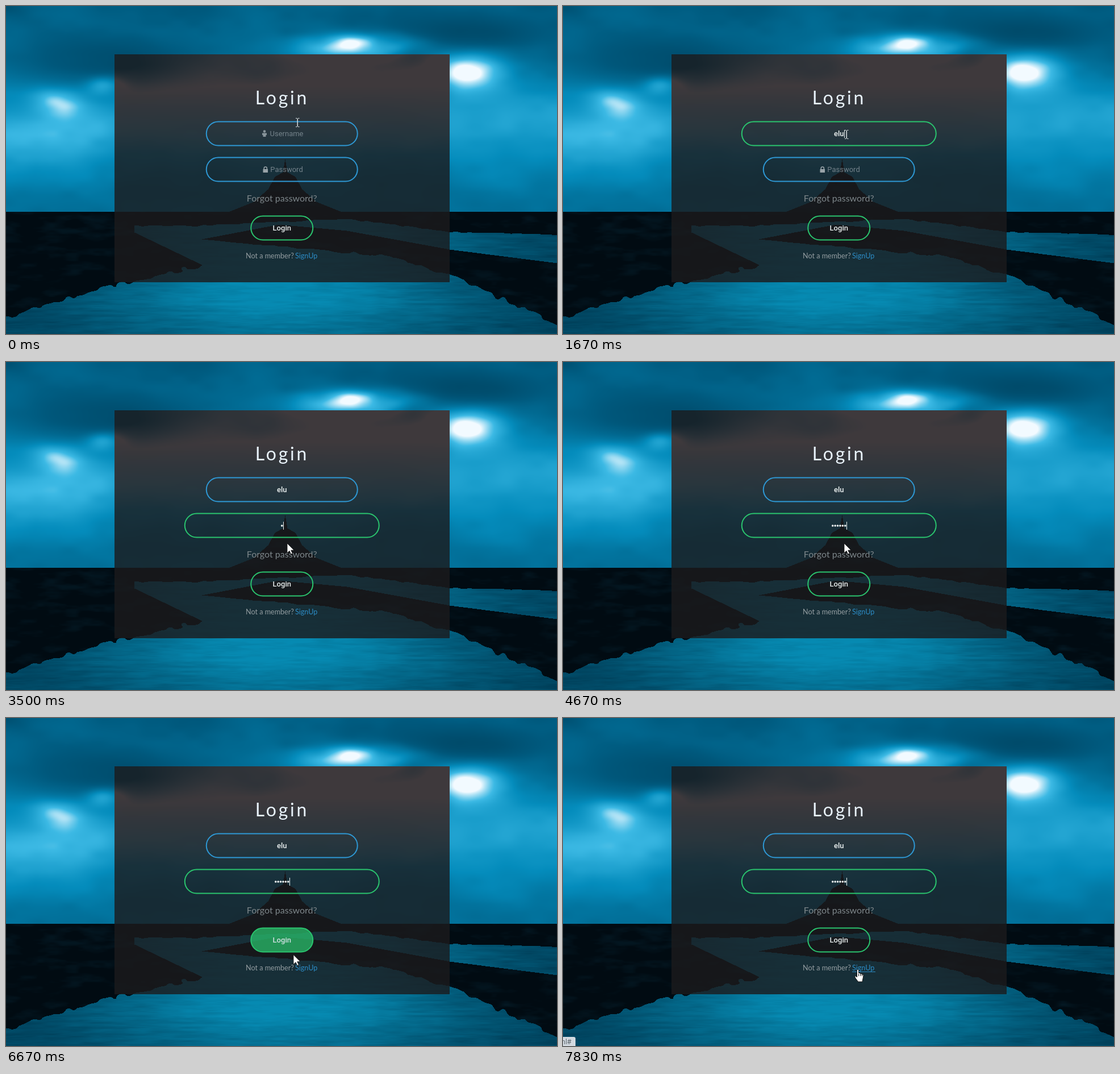
Animation of 970 by 577 pixels, one loop 8000 ms. Source, as an HTML page with a canvas:

```html
<!DOCTYPE html>
<html lang="en">
<head>
<meta charset="utf-8">
<title>Login</title>
<style>
html, body { margin: 0; width: 970px; height: 577px; overflow: hidden; background: #02131b; }
canvas { display: block; }
</style>
</head>
<body>
<canvas id="stage" width="970" height="577"></canvas>
<script>
const W = 970, H = 577, LOOP = 8000, RATE = 6;
const HORIZON = 362, CENTER = 485.75;
const BLUE = [46, 152, 212], GREEN = [42, 196, 110];
const c = document.getElementById('stage').getContext('2d');

const clamp = v => Math.min(1, Math.max(0, v));
const mix = (a, b, k) => a + (b - a) * k;
const blend = (p, q, k) => p.map((v, i) => mix(v, q[i], k));
const smooth = k => k * k * (3 - 2 * k);
const bell = d => Math.exp(-d * d);
const rgb = (p, a = 1) => `rgba(${p.map(Math.round).join()},${a})`;

// CSS "ease" timing curve
function ease(x) {
  x = clamp(x);
  let lo = 0, hi = 1, s = 0.5;
  for (let i = 0; i < 18; i++) {
    s = (lo + hi) / 2;
    const bx = 0.75 * s * (1 - s) + s * s * s;
    if (bx < x) lo = s; else hi = s;
  }
  return 0.3 * s * (1 - s) * (1 - s) + 3 * s * s * (1 - s) + s * s * s;
}
const ramp = (t, start) => ease((t - start) / 250);

// height of a line through [x, y] points
function along(points, x) {
  let i = 1;
  while (i < points.length - 1 && points[i][0] < x) i++;
  const [x0, y0] = points[i - 1], [x1, y1] = points[i];
  return mix(y0, y1, clamp((x - x0) / (x1 - x0)));
}

// ---- landscape ----

let seed = 7;
const lattice = Float32Array.from({ length: 4096 }, () =>
  (seed = (seed * 16807) % 2147483647) / 2147483647 - 0.5);

function noise(x, y) {
  const i = Math.floor(x), j = Math.floor(y);
  const u = smooth(x - i), v = smooth(y - j);
  const at = (a, b) => lattice[(a & 63) + (b & 63) * 64];
  return mix(mix(at(i, j), at(i + 1, j), u), mix(at(i, j + 1), at(i + 1, j + 1), u), v);
}
const clouds = (x, y) => noise(x, y) + noise(x * 2, y * 2) / 2 + noise(x * 4, y * 4) / 4;

const SKY = [[0, 52, 76], [0, 88, 124], [4, 140, 188], [60, 185, 228], [242, 250, 255]];
// x, y, width, height, strength
const GLOWS = [
  [610, 68, 95, 20, 0.6], [815, 115, 55, 30, 0.55], [90, 168, 45, 24, 0.35],
  [172, 140, 32, 16, 0.35], [70, 225, 130, 45, 0.12],
  [180, 110, 150, 50, -0.2], [800, 50, 160, 38, -0.14]
];

function skyTone(x, y) {
  const n = clouds(x / 110, y / 60);
  let tone = 0.28 + 0.12 * y / HORIZON + 0.25 * bell((y - 205) / 85) + 0.1 * n;
  for (const [gx, gy, w, h, power] of GLOWS) {
    const dx = (x - gx) / w, dy = (y - gy) / h;
    const d = dx * dx + dy * dy;
    if (d < 6) tone += power * Math.exp(-d) * (1 + n);
  }
  return clamp(tone);
}

function skyColor(tone) {
  const i = Math.min(3, Math.floor(tone * 4));
  return blend(SKY[i], SKY[i + 1], tone * 4 - i);
}

const FAR_BANK = [[340, 386], [600, 374], [781, 397], [W, 402]];
const LEFT_BANK = [[0, 548], [190, 490], [345, 456]];
const RIGHT_TOP = [[344, 410], [480, 384], [600, 395], [781, 428], [W, 452]];
const RIGHT_LOW = [[344, 410], [520, 426], [690, 442], [781, 474], [W, 558]];
const ABBEY = [[0, 269], [4, 292], [18, 300], [30, 322], [55, 344], [100, HORIZON]];

function isLand(x, y) {
  if (y < HORIZON) return Math.abs(x - 491) < 100 && y > along(ABBEY, Math.abs(x - 491));
  const rough = 10 * noise(x / 12, y / 9);
  if (y < along(FAR_BANK, x) + rough / 4) return true;
  if (x < 346 && y < along(LEFT_BANK, x) + rough && (x < 226 || y > 398 + (x - 226) * 0.48)) return true;
  return x > 344 && y > along(RIGHT_TOP, x) && y < along(RIGHT_LOW, x) + rough * clamp((x - 344) / 400);
}

function groundColor(x, y) {
  if (isLand(x, y)) return blend([1, 11, 18], [8, 42, 58], clamp(clouds(x / 40, y / 12) * 0.6));
  const light = bell((x - 480) / 330) * (1 - 0.35 * clamp((y - 520) / 57));
  return blend([0, 62, 88], [6, 138, 178], clamp(light + 0.18 * clouds(x / 40, y / 4)));
}

function sceneColor(x, y) {
  const veiled = x >= 191 && x < 781 && y >= 85 && y < 486;
  const sky = y < HORIZON && !isLand(x, y);
  const tone = sky ? skyTone(x, y) : 0;
  const color = sky ? skyColor(tone) : groundColor(x, y);
  if (!veiled) return color;
  const warm = sky ? clamp((tone - 0.2) * 4.5) * clamp((260 - y) / 120) : 0;
  return blend(blend(color, [27, 26, 28], 0.81), [62, 57, 60], warm);
}

function paintScene(ctx) {
  const img = ctx.createImageData(W, H);
  for (let y = 0, i = 0; y < H; y++) {
    for (let x = 0; x < W; x++, i += 4) {
      img.data.set(sceneColor(x, y), i);
      img.data[i + 3] = 255;
    }
  }
  ctx.putImageData(img, 0, 0);
}

const backdrop = document.createElement('canvas');
backdrop.width = W;
backdrop.height = H;
paintScene(backdrop.getContext('2d'));

// ---- form ----

const NAME = 'elu', DIGITS = 6;
const FOCUS_NAME = 550, FOCUS_PASS = 2490, LAST_LETTER = 1550, LAST_DIGIT = 4450;
const INPUT = '500 13px Roboto, sans-serif';
const HINT = '13px Roboto, sans-serif';
const SMALL = '12.6px Lato, sans-serif';
const HINT_COLOR = '#74828a', TYPED_COLOR = '#eef3f3';

function label(str, x, y, font, color, align = 'center', spacing = 0) {
  c.font = font;
  c.fillStyle = color;
  c.textAlign = align;
  c.letterSpacing = spacing + 'px';
  c.fillText(str, x, y);
}

function disc(x, y, r) {
  c.beginPath();
  c.arc(x, y, r, 0, 7);
  c.fill();
}

function pill(y, w, stroke, fill) {
  c.beginPath();
  c.roundRect(CENTER - w / 2 + 1, y + 1, w - 2, 42, 21);
  if (fill) { c.fillStyle = fill; c.fill(); }
  c.strokeStyle = stroke;
  c.lineWidth = 2;
  c.stroke();
}

function field(y, focus) {
  pill(y, mix(268, 344, focus), rgb(blend(BLUE, GREEN, focus)));
}

function caret(x, y, age) {
  if (age > 0 && age % 1000 >= 500) return;
  c.fillStyle = '#e8eeee';
  c.fillRect(Math.round(x), y, 1, 14);
}

function personIcon() {
  c.fillStyle = '#88949a';
  disc(455, 220.5, 2.3);
  c.fillRect(451, 223.5, 8, 3.5);
  c.fillRect(452.5, 224, 5, 6);
}

function lockIcon() {
  c.fillStyle = c.strokeStyle = '#98a3a8';
  c.fillRect(452.5, 287, 8.5, 6);
  c.lineWidth = 1.5;
  c.beginPath();
  c.roundRect(454.2, 283, 5.2, 6, 2.6);
  c.stroke();
}

function drawName(t) {
  const typed = NAME.slice(0, Math.floor(clamp((t - 950) / 600) * NAME.length));
  field(202.5, ramp(t, FOCUS_NAME) - ramp(t, FOCUS_PASS));
  if (typed) {
    label(typed, CENTER, 229, INPUT, TYPED_COLOR);
  } else {
    personIcon();
    label('Username', 494, 229, HINT, HINT_COLOR);
  }
  if (t < FOCUS_NAME || t >= FOCUS_PASS) return;
  c.font = INPUT;
  caret(CENTER + c.measureText(typed).width / 2, 218, t - LAST_LETTER);
}

function drawPassword(t) {
  const typed = Math.floor(clamp((t - 3250) / (LAST_DIGIT - 3250)) * DIGITS);
  field(265.5, ramp(t, FOCUS_PASS));
  if (typed) {
    c.fillStyle = TYPED_COLOR;
    for (let i = 0; i < typed; i++) disc(CENTER + (i - (typed - 1) / 2) * 4.4, 288, 1.8);
  } else {
    lockIcon();
    label('Password', 494, 292, HINT, HINT_COLOR);
  }
  if (t >= FOCUS_PASS) caret(CENTER + typed * 2.2, 281, t - LAST_DIGIT);
}

function drawButton(t) {
  const hover = ramp(t, 5550) - ramp(t, 6620);
  pill(368.5, 111, rgb(GREEN), rgb(GREEN, hover));
  label('Login', CENTER, 395, INPUT, rgb(blend([233, 239, 239], [200, 220, 222], hover)));
}

function drawLinks(t) {
  label('Forgot password?', CENTER, 344, '16px Lato, sans-serif', '#7d868a');
  label('Not a member?', 422, 444, SMALL, '#949da1', 'left');
  label('SignUp', 509, 444, SMALL, '#2c8cc6', 'left');
  if (t >= 6950) c.fillRect(509, 446, 41, 1);
}

function drawStatus(t) {
  if (t < 7160) return;
  c.fillStyle = '#d3dae1';
  c.beginPath();
  c.roundRect(-4, 561, 26, 20, 3);
  c.fill();
  label('ml#', 15, 574, '12px "Open Sans", sans-serif', '#4c555c', 'right');
}

// ---- pointer ----

// start, end, x, y of each glide
const MOVES = [
  [0, 500, 499, 226], [1830, 2400, 488, 281], [3000, 3350, 495, 319],
  [4670, 5000, 497, 340], [5300, 5700, 491, 387], [6300, 7000, 519, 442]
];

function pointerAt(t) {
  let x = 513, y = 205;
  for (const [from, to, nx, ny] of MOVES) {
    const k = smooth(clamp((t - from) / (to - from)));
    x = mix(x, nx, k);
    y = mix(y, ny, k);
  }
  return [x, y];
}

function beam() {
  c.fillStyle = '#d6dcde';
  c.fillRect(-0.5, -7, 1.5, 14);
  for (const y of [-8, 7]) {
    c.fillRect(-3, y, 2.5, 1);
    c.fillRect(1, y, 2.5, 1);
  }
}

function arrow() {
  c.fillStyle = '#fff';
  c.strokeStyle = '#111';
  c.lineWidth = 0.8;
  const path = new Path2D('M0 0V17L4 13.2 6.8 19 9.4 17.8 6.7 12.2 12 12Z');
  c.fill(path);
  c.stroke(path);
}

function hand() {
  c.fillStyle = '#fff';
  c.strokeStyle = '#111';
  c.lineWidth = 1;
  const path = new Path2D('M-1.5 14V1.5Q0-1 1.5 1.5V7Q4 5.5 5 8 7 7 7.6 9 10 8 10 11L8 22H.5L-4.5 15Q-6 11-3.5 12Z');
  c.fill(path);
  c.stroke(path);
  for (const x of [1.5, 4.6, 7.4]) {
    c.fillStyle = '#111';
    c.fillRect(x - 0.5, 8, 1, 4);
  }
}

function drawClick(x, y, age) {
  if (age < 0 || age > 430) return;
  c.fillStyle = 'rgba(186,184,20,.93)';
  c.beginPath();
  c.arc(x, y, 12.5, 0, 7);
  c.arc(x, y, 12.5 * age / 430, 0, 7, true);
  c.fill('evenodd');
}

function drawPointer(t) {
  const [x, y] = pointerAt(t);
  const overLink = (y > 369 && y < 412) || y > 436;
  c.save();
  c.translate(x, y);
  if (t < 2000) beam(); else if (overLink) hand(); else arrow();
  c.restore();
}

function draw(t) {
  c.drawImage(backdrop, 0, 0);
  label('Login', 486, 173, '32px Lato, sans-serif', '#e9f3fb', 'center', 3.8);
  drawName(t);
  drawPassword(t);
  drawButton(t);
  drawLinks(t);
  drawStatus(t);
  drawClick(499, 224, t - FOCUS_NAME);
  drawClick(489, 279, t - FOCUS_PASS);
  drawPointer(t);
}

// the picture moves on six times a second
const start = performance.now();
function tick() {
  const t = (performance.now() - start) % LOOP;
  const step = Math.floor((t + 1) * RATE / 1000) % (LOOP * RATE / 1000);
  draw(step * 1000 / RATE);
  requestAnimationFrame(tick);
}
tick();
</script>
</body>
</html>
```
